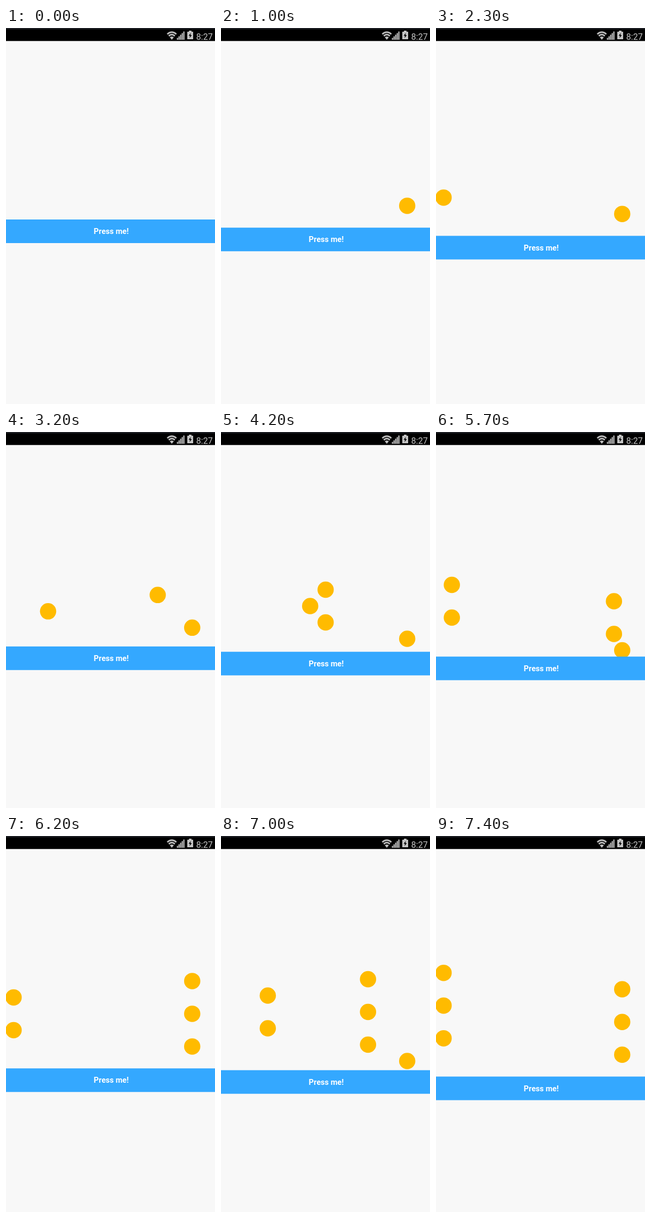
Animation, 392 px wide and 701 px high, one loop 8 s. Source, as an HTML page:

```html
<!DOCTYPE html>
<html lang="en">
<head>
<meta charset="utf-8">
<style>
  html, body { margin: 0; width: 100%; height: 100%; overflow: hidden; background: #f8f8f8; }
  svg { display: block; width: 392px; height: 701px; }
  text { font-family: Roboto, sans-serif; }
</style>
</head>
<body>
<svg viewBox="0 0 392 701">
  <rect width="392" height="701" fill="#f8f8f8"/>
  <g id="dots" fill="#ffbb00"></g>
  <g id="button">
    <rect width="392" height="44" fill="#34a8ff"/>
    <text x="197.4" y="27.2" font-size="14.6" font-weight="700" fill="#fff" text-anchor="middle">Press me!</text>
  </g>
  <g id="status">
    <rect y="24" width="392" height="1" fill="#b8b8b8"/>
    <rect width="392" height="24" fill="#000"/>
    <rect width="392" height="2.5" fill="#1d1f24"/>
    <g fill="none" stroke="#bcbcbc" stroke-width="2.9">
      <path d="M302.5 11.5Q311 4 319.5 11.5"/>
      <path d="M305.3 14.9Q311 9.8 316.7 14.9"/>
    </g>
    <path d="M307.2 17.3Q311 14 314.8 17.3L311 22Z" fill="#bcbcbc"/>
    <g id="bars" fill="#bcbcbc"></g>
    <path d="M343 5h5v2h3v14h-11V7h3z" fill="#c4c4c4"/>
    <path d="M346.8 9l-4.3 5.5h2.6l-.8 4.3 4.3-5.6h-2.7z" fill="#000"/>
    <text x="356.8" y="22" font-size="16" fill="#c4c4c4">8:27</text>
  </g>
</svg>
<script>
const LOOP = 8000, TICK = 100, DURATION = 580;
const SIZE = 30.5, LEFT = 14.25, RIGHT = 349.25;
// Each press: [time, time already elapsed in its first tick]
const presses = [[500, 80], [1800, 110], [2800, 12], [4000, 74], [5700, 80], [6900, 80]];

const $ = id => document.getElementById(id);

function add(parent, tag, attrs) {
  const el = document.createElementNS("http://www.w3.org/2000/svg", tag);
  for (const key in attrs) el.setAttribute(key, attrs[key]);
  return parent.appendChild(el);
}

for (let i = 0; i < 5; i++) {
  const height = 3.5 + i * 3;
  add($("bars"), "rect", { x: 320.5 + i * 3, y: 22 - height, width: 2.3, height });
}
const dots = presses.map(() => add($("dots"), "circle", { r: SIZE / 2 }));

const ease = t => (1 - Math.cos(Math.PI * Math.min(1, t))) / 2;
const mix = (a, b, p) => a + (b - a) * p;
// The bottom dot sits on the right, and sides alternate going up
const side = (i, count) => (count - i) % 2 ? RIGHT : LEFT;

function draw(ms) {
  const now = Math.floor(ms % LOOP / TICK) * TICK;
  const count = presses.filter(([start]) => start <= now).length;
  let p = 1;
  if (count) {
    const [start, lead] = presses[count - 1];
    p = ease((now - start + lead) / DURATION);
  }
  const shift = count ? (count - 1 + p) * SIZE / 2 : 0;
  dots.forEach((dot, i) => {
    const shown = i < count;
    dot.style.display = shown ? "" : "none";
    if (!shown) return;
    const from = i === count - 1 ? RIGHT : side(i, count - 1);
    dot.setAttribute("cx", mix(from, side(i, count), p));
    dot.setAttribute("cy", 346.65 + i * SIZE - shift);
  });
  $("button").setAttribute("transform", `translate(0 ${357 + shift})`);
}

const origin = performance.now();
function frame() {
  draw(performance.now() - origin);
  requestAnimationFrame(frame);
}
frame();
</script>
</body>
</html>
```
